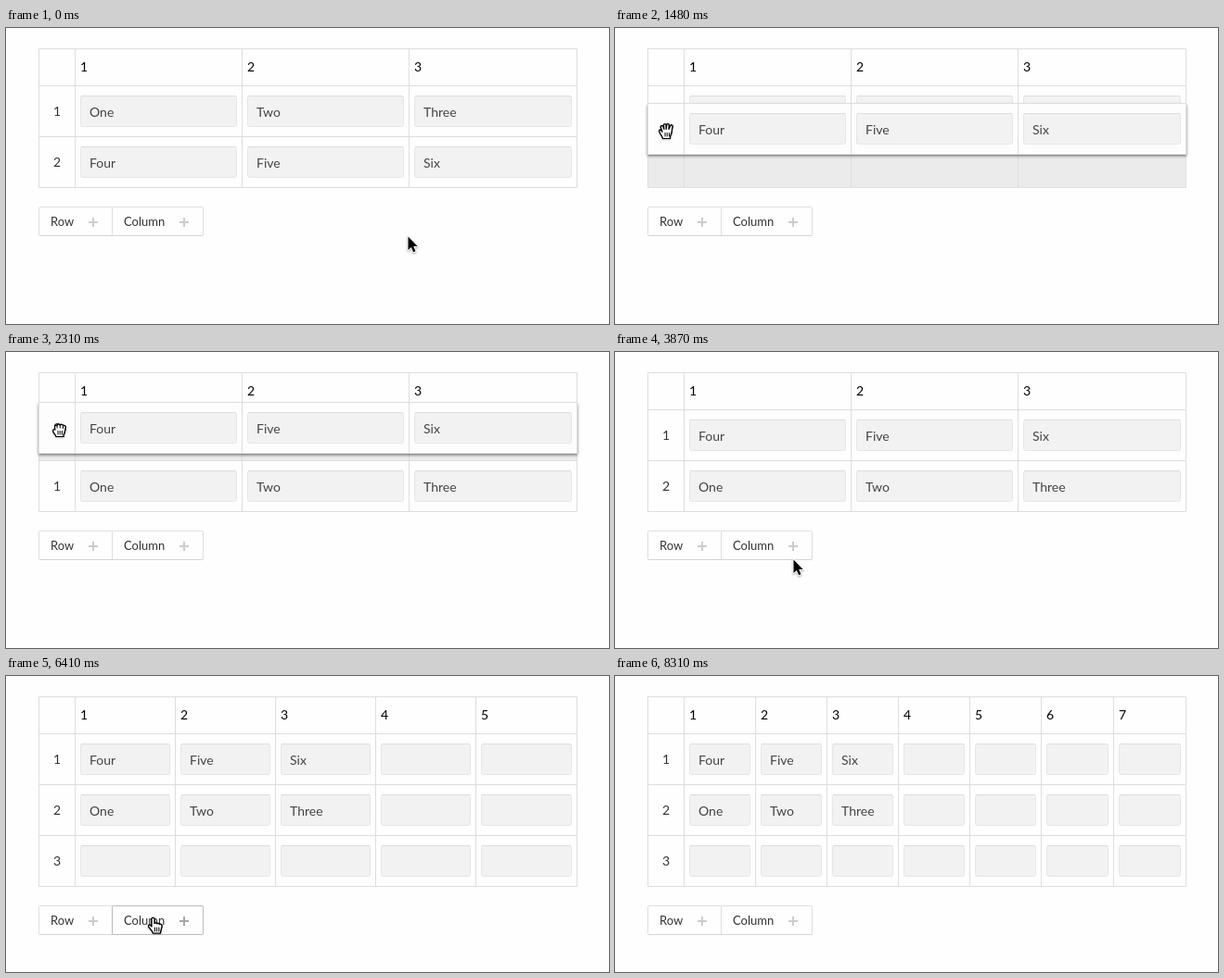
Write an HTML page with a canvas that moves like this. It is 650 px wide and 320 px high and loops after 8930 ms.

```html
<!DOCTYPE html>
<html lang="en">
<head>
<meta charset="utf-8">
<title>Editable table</title>
<style>
  html, body { margin: 0; width: 100%; height: 100%; overflow: hidden; background: #fefefe; }
  canvas { display: block; }
</style>
</head>
<body>
<canvas id="stage" width="650" height="320"></canvas>
<script>
const ctx = document.getElementById('stage').getContext('2d');
const LOOP = 8930, LEFT = 35, RIGHT = 615, TOP = 22, HEAD = 62, ROW = 55;
const LINE = '#dedede', BG = '#fefefe';
const LIFT = 1070, SWAP = 2070, DROP = 2430, GONE = 8310;
const first = ['One', 'Two', 'Three'], second = ['Four', 'Five', 'Six'];

// Mouse moves: start, end, number of steps, target x, target y
const moves = [
  [120, 240, 3, 375, 228], [300, 590, 6, 38, 158], [650, 710, 2, 52, 149],
  [1070, 1480, 8, 55, 111], [1540, 1890, 7, 57, 76], [2070, 2310, 5, 57, 84],
  [2790, 3150, 7, 188, 226], [3390, 3390, 1, 190, 225],
  [3870, 3870, 1, 192, 224], [3930, 4050, 3, 175, 217],
  [5060, 5350, 5, 60, 203], [6130, 6410, 6, 158, 261],
  [6470, 6640, 4, 161, 267], [8200, 8255, 2, 271, 265]
];

const cursors = {
  arrow: ['M0 0V14.5L3.3 11.4L5.6 16.8L8 15.8L5.7 10.5H10.2Z'],
  pointer: ['M-1.5 1C-1.5-.6 1.5-.6 1.5 1V6C1.8 5 4 5 4.3 6.3C4.8 5.6 6.6 5.7 6.9 7C7.5 6.5 9.5 6.8 9.5 8.5' +
    'C9.5 12 8 13 8 16.5H0C-.5 13.5-4 11.5-5 9C-5 7-3 7-1.5 9.5Z', 'M2 10.5v4M4.2 10.5v4M6.4 10.5v4'],
  hand: ['M-4 8C-4 5.5-8 2-8-.5C-7.5-2-5.8-1.2-4.5.8L-6.2-4.2C-6.5-6-4.3-6.6-3.7-5L-2.6-2L-3-6.5' +
    'C-3-8.2-.8-8.2-.6-6.5L-.3-2L.3-7C.5-8.5 2.7-8.3 2.6-6.6L2.5-2L4.2-5.8C5-7.2 7-6.5 6.5-4.8' +
    'C5.5-1 6 3 4 5.5V8Z', 'M-1.5 2v3.5M.7 2v3.5M2.9 2v3.5'],
  fist: ['M-3.5 7C-3.5 5-7 3.5-6.8.5C-6.5-1-5-1-4.5-.5C-6-5-3.5-6-2.4-5C-2-6.8.2-6.8.8-5.3' +
    'C1.5-6.6 3.6-6.3 4-4.8C5.5-5.5 7-4.5 6.6-2.5C6.3 1 6 3 4.5 5V7Z',
    'M-2.4-5v2.5M.8-5v2.5M4-4.5v2.5M-1.5 1v3.5M.7 1v3.5M2.9 1v3.5']
};

function rect(x, y, w, h, color) {
  ctx.fillStyle = color;
  ctx.fillRect(x, y, w, h);
}

function text(s, x, y, size, color, align = 'left') {
  ctx.font = size + 'px Lato, sans-serif';
  ctx.fillStyle = color;
  ctx.textAlign = align;
  ctx.fillText(s, x, y);
}

function mouseAt(t) {
  let x = 433, y = 225;
  for (const [start, end, steps, tx, ty] of moves) {
    if (t < start) break;
    const gap = (end - start) / (steps - 1) || 1;
    const p = Math.min(1, (Math.floor((t - start) / gap + 1e-6) + 1) / steps);
    x += (tx - x) * p;
    y += (ty - y) * p;
  }
  return { x: Math.round(x), y: Math.round(y) };
}

function edges(cols) {
  const list = [];
  for (let i = 0; i < cols; i++) list.push(Math.floor(74 + i * 540.2 / cols));
  return [...list, RIGHT];
}

function verticals(xs, y, h) {
  for (const x of [LEFT, ...xs]) rect(x, y, 1, h, LINE);
}

function input(x, y, w) {
  ctx.beginPath();
  ctx.roundRect(x + .5, y + .5, w - 1, 33, 2);
  ctx.fillStyle = '#f2f2f2';
  ctx.fill();
  ctx.strokeStyle = '#e6e6e6';
  ctx.lineWidth = 1;
  ctx.stroke();
  rect(x + 1, y, w - 2, 1, '#dcdcdc');
}

function row(xs, y, label, words) {
  verticals(xs, y, ROW + 1);
  rect(LEFT, y, RIGHT - LEFT + 1, 1, LINE);
  rect(LEFT, y + ROW, RIGHT - LEFT + 1, 1, LINE);
  text(label, 55, y + 33, 14, '#333', 'center');
  for (let i = 0; i < xs.length - 1; i++) {
    input(xs[i] + 6, y + 11, xs[i + 1] - xs[i] - 11);
    text(words[i] || '', xs[i] + 16, y + 34, 14, '#444');
  }
}

function gap(xs, y) {
  rect(LEFT, y, RIGHT - LEFT, ROW, '#ebebeb');
  verticals(xs, y, ROW + 1);
  rect(LEFT, y + ROW, RIGHT - LEFT + 1, 1, LINE);
}

function liftedRow(xs, y) {
  ctx.save();
  ctx.shadowColor = 'rgba(0,0,0,.5)';
  ctx.shadowBlur = 3;
  ctx.shadowOffsetY = 1.5;
  rect(LEFT, y, RIGHT - LEFT + 1, ROW + 1, '#fdfdfd');
  ctx.restore();
  row(xs, y, 2, second);
}

function table(t, mouse, cols, rows) {
  const xs = edges(cols);
  verticals(xs, TOP, HEAD - TOP);
  rect(LEFT, TOP, RIGHT - LEFT + 1, 1, LINE);
  rect(LEFT, HEAD, RIGHT - LEFT + 1, 1, LINE);
  for (let i = 0; i < cols; i++) text(i + 1, xs[i] + 6, 47, 14, '#000');

  if (t >= LIFT && t < DROP) {
    const swapped = t >= SWAP;
    gap(xs, swapped ? HEAD : HEAD + ROW);
    row(xs, swapped ? HEAD + ROW : HEAD, 1, first);
    liftedRow(xs, Math.min(HEAD + ROW, mouse.y - 30));
    return;
  }
  const data = t < LIFT ? [first, second] : [second, first];
  for (let i = 0; i < rows; i++) row(xs, HEAD + i * ROW, i + 1, data[i] || []);
}

function frame(x, y, w, color) {
  ctx.strokeStyle = color;
  ctx.lineWidth = 1;
  ctx.beginPath();
  ctx.roundRect(x + .5, y + .5, w, 31, 1);
  ctx.stroke();
}

function button(label, x, y, w, hover) {
  if (hover) frame(x, y, w, '#bbb');
  text(label, x + 13, y + 21, 13, '#333');
  const cx = x + w - 20, cy = y + 17, color = hover ? '#a8a8a8' : '#ccc';
  rect(cx - 5, cy - 1, 10, 2, color);
  rect(cx - 1, cy - 5, 2, 10, color);
}

function cursor(kind, { x, y }) {
  const [shape, detail] = cursors[kind].map(d => new Path2D(d));
  const arrow = kind === 'arrow';
  ctx.save();
  ctx.translate(x + .5, y + .5);
  ctx.lineJoin = ctx.lineCap = 'round';
  ctx.shadowColor = 'rgba(0,0,0,.35)';
  ctx.shadowBlur = 2;
  ctx.shadowOffsetY = 1;
  ctx.lineWidth = arrow ? 2 : 1.2;
  ctx.strokeStyle = arrow ? '#fff' : '#000';
  ctx.fillStyle = arrow ? '#000' : '#fff';
  ctx.stroke(shape);
  ctx.shadowColor = 'transparent';
  ctx.fill(shape);
  if (!arrow) {
    ctx.stroke(shape);
    ctx.lineWidth = 1;
    ctx.stroke(detail);
  }
  ctx.restore();
}

function draw(t) {
  const mouse = mouseAt(t);
  const cols = 3 + [4280, 4700, 6940, 7180].filter(at => t >= at).length;
  const rows = t < 5590 ? 2 : 3;
  const bottom = HEAD + rows * ROW, y = bottom + 21;
  const shown = t < GONE;
  const over = (x0, x1, y0, y1) =>
    shown && mouse.x >= x0 && mouse.x < x1 && mouse.y >= y0 && mouse.y < y1;
  const onRow = over(35, 114, y, y + 31), onColumn = over(114, 213, y, y + 31);

  rect(0, 0, 650, 320, BG);
  table(t, mouse, cols, rows);
  frame(35, y, 79, LINE);
  frame(114, y, 98, LINE);
  rect(36, y + 31, 176, 1, '#d4d4d4');
  button('Row', 35, y, 79, onRow);
  button('Column', 114, y, 98, onColumn);

  if (!shown) return;
  let kind = 'arrow';
  if (t >= SWAP && t < DROP) kind = 'fist';
  else if (over(35, 75, HEAD, bottom)) kind = 'hand';
  else if (onRow || onColumn) kind = 'pointer';
  cursor(kind, mouse);
}

const begin = performance.now();
function tick() {
  draw((performance.now() - begin) % LOOP);
  requestAnimationFrame(tick);
}
tick();
</script>
</body>
</html>
```
